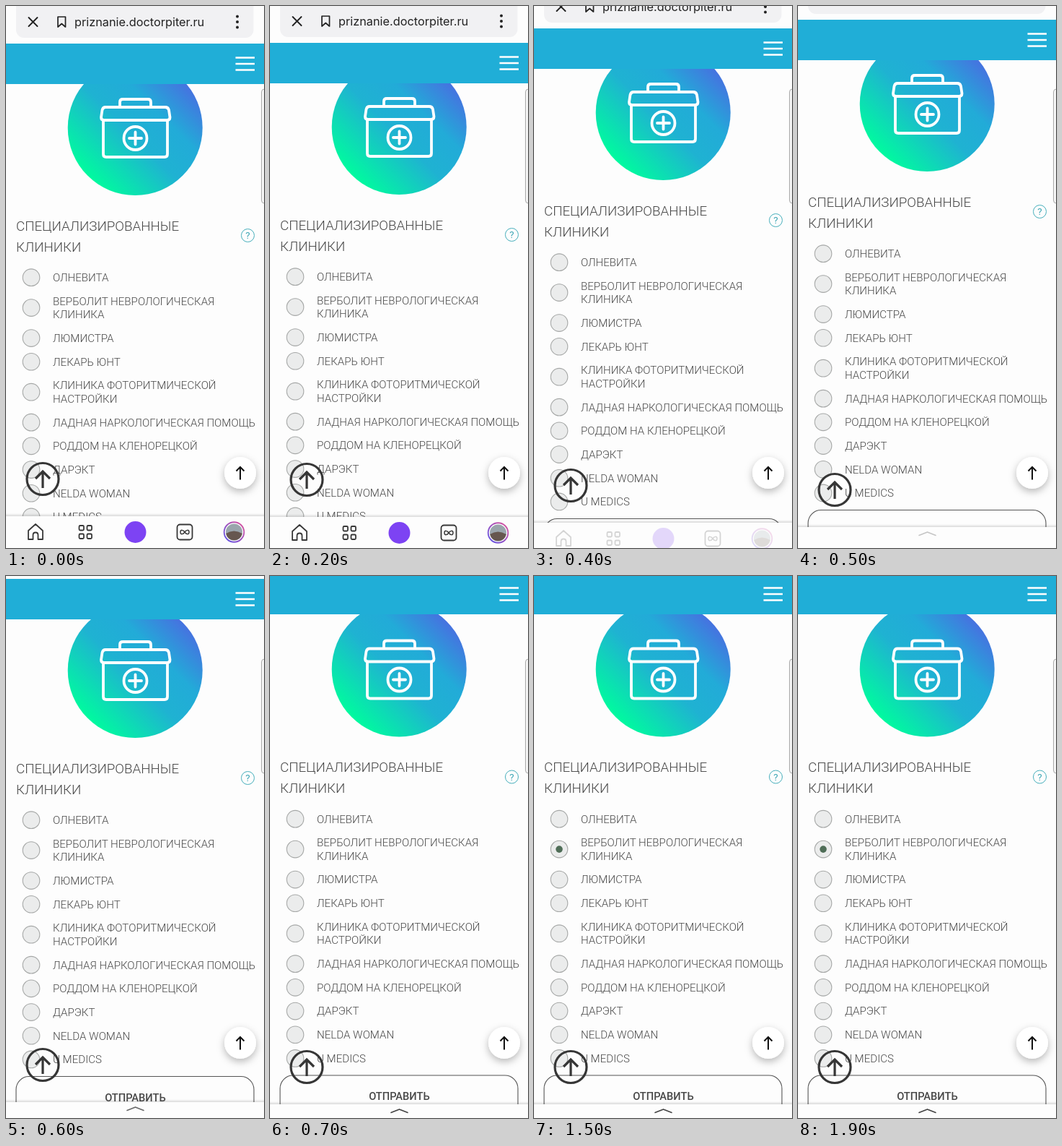
Recreate the animation shown at these times as an HTML page. Size 358 px wide and 750 px high, loop 2.1 s.

```html
<!DOCTYPE html>
<html lang="ru">
<head>
<meta charset="utf-8">
<title>Выбор клиники</title>
<style>
  html, body { margin: 0; width: 100%; height: 100%; overflow: hidden; background: #fdfdfd; }
  svg { display: block; width: 100%; height: 100%; }
  text { font-family: Roboto, sans-serif; fill: #484848; }
  .title { font-size: 18.75px; font-weight: 300; }
  .item { font-size: 15.1px; font-weight: 300; }
  .line { fill: none; stroke-linecap: round; stroke-linejoin: round; }
</style>
</head>
<body>
<svg viewBox="0 0 358 750">
  <defs>
    <linearGradient id="badge" gradientUnits="userSpaceOnUse" x1="113" y1="234" x2="245" y2="102">
      <stop offset="0" stop-color="#00fa9f"/>
      <stop offset=".45" stop-color="#1fb2d2"/>
      <stop offset=".7" stop-color="#22abd8"/>
      <stop offset="1" stop-color="#4672e0"/>
    </linearGradient>
    <linearGradient id="ring" x1="0" y1="1" x2="1" y2="0">
      <stop offset="0" stop-color="#5a55e8"/>
      <stop offset="1" stop-color="#e0559a"/>
    </linearGradient>
    <linearGradient id="edge" x1="0" y1="0" x2="0" y2="1">
      <stop offset="0" stop-color="#000" stop-opacity="0"/>
      <stop offset="1" stop-color="#000" stop-opacity=".14"/>
    </linearGradient>
    <filter id="shadow" x="-60%" y="-60%" width="220%" height="220%">
      <feDropShadow dx="0" dy="4" stdDeviation="5.500" flood-opacity=".28"/>
    </filter>
  </defs>

  <rect width="358" height="750" fill="#fdfdfd"/>

  <g id="content">
    <circle cx="179.2" cy="168.5" r="93.5" fill="url(#badge)"/>
    <g class="line" stroke="#fff" stroke-width="3.8">
      <path d="M158 139v-6q0-4 4-4h35q4 0 4 4v6"/>
      <path d="M138 140h83q4 0 5 4l1.500 10q0 4-4 4h-87.500q-4 0-4-4l1.500-10q1-4 4.500-4z"/>
      <path d="M135 159v46q0 4 4 4h81q4 0 4-4v-46"/>
      <circle cx="179.500" cy="183" r="16"/>
      <path d="M179.500 174.500v17M171 183h17"/>
    </g>
    <text class="title" x="14" y="310.500">СПЕЦИАЛИЗИРОВАННЫЕ</text>
    <text class="title" x="14" y="339.800">КЛИНИКИ</text>
    <circle cx="335.500" cy="317.500" r="9" fill="none" stroke="#45aebb"/>
    <text x="335.500" y="322.300" font-size="13.500" text-anchor="middle" style="fill:#3aa5b4">?</text>
    <g id="list"></g>
    <rect x="14" y="730.500" width="330" height="62" rx="18" fill="#fdfdfd" stroke="#555" stroke-width="1.100"/>
    <text x="179.500" y="764.500" font-size="14.700" font-weight="500" text-anchor="middle">ОТПРАВИТЬ</text>
  </g>

  <rect x="354.500" y="115" width="12" height="158" rx="4" fill="#f4f4f4" stroke="#aaa"/>

  <g id="header">
    <rect y="-10" width="358" height="63" fill="#fdfdfd"/>
    <rect x="14" y="-20" width="329.500" height="64" rx="11" fill="#f1f1f3"/>
    <g class="line" stroke="#222" stroke-width="1.900">
      <path d="M31.500 16l12 12m0-12l-12 12"/>
      <path d="M72 15h10.500v14l-5.250-4.500l-5.250 4.500z" stroke-width="1.700"/>
    </g>
    <text x="95" y="27.500" font-size="16.300" style="font-family:Inter,sans-serif;fill:#222">priznanie.doctorpiter.ru</text>
    <g fill="#222">
      <circle cx="321" cy="14.500" r="2"/><circle cx="321" cy="22" r="2"/><circle cx="321" cy="29.500" r="2"/>
    </g>
    <rect y="52" width="358" height="56" fill="#20aed7"/>
    <path d="M318.500 71.500h26.500m-26.500 8.500h26.500m-26.500 8.500h26.500" fill="none" stroke="#fff" stroke-width="2.700"/>
  </g>

  <g id="floating" class="line" stroke="#363636" stroke-width="3.200">
    <circle cx="51" cy="654.500" r="22"/>
    <path d="M51 667v-23m-10 10l10-10l10 10" stroke-linecap="butt" stroke-linejoin="miter"/>
  </g>

  <g>
    <circle cx="325" cy="646" r="22" fill="#fff" filter="url(#shadow)"/>
    <path d="M325 655.500v-17.500m-5.500 5.500l5.500-5.500l5.500 5.500" fill="none" stroke="#111" stroke-width="2"/>
  </g>

  <g id="bar">
    <rect y="702" width="358" height="4" fill="url(#edge)"/>
    <rect y="706" width="358" height="90" fill="#fdfdfd"/>
    <g id="icons">
      <g class="line" stroke="#383838" stroke-width="1.800">
        <path d="M31 726l10-9l10 9v12h-6.500v-6q0-3.500-3.500-3.500t-3.500 3.500v6h-6.500z"/>
        <rect x="101.500" y="719" width="6.500" height="6.500" rx="1.500"/>
        <rect x="112.500" y="719" width="6.500" height="6.500" rx="1.500"/>
        <rect x="101.500" y="730.500" width="6.500" height="6.500" rx="1.500"/>
        <rect x="112.500" y="730.500" width="6.500" height="6.500" rx="1.500"/>
        <rect x="237.500" y="717.500" width="21" height="21" rx="4"/>
        <path d="M248 728c-2-3-6-4-6 0s4 3 6 0s6-4 6 0s-4 3-6 0" stroke-width="1.500"/>
      </g>
      <circle cx="179.500" cy="728" r="15" fill="#7d43f3"/>
      <circle cx="316.500" cy="728" r="13.800" fill="#fff" stroke="url(#ring)" stroke-width="1.900"/>
      <circle cx="316.500" cy="728" r="11.500" fill="#9aa5ac"/>
      <path d="M305.200 730q11-7 22.600 0a11.500 11.500 0 0 1-22.600 0z" fill="#66574f"/>
    </g>
    <path id="chevron" class="line" d="M168 717.500l11.500-4.500l11.500 4.500" stroke="#444" stroke-width="1.600"/>
  </g>
</svg>

<script>
  const $ = id => document.getElementById(id);

  const clinics = [
    ["ОЛНЕВИТА"],
    ["ВЕРБОЛИТ НЕВРОЛОГИЧЕСКАЯ", "КЛИНИКА"],
    ["ЛЮМИСТРА"],
    ["ЛЕКАРЬ ЮНТ"],
    ["КЛИНИКА ФОТОРИТМИЧЕСКОЙ", "НАСТРОЙКИ"],
    ["ЛАДНАЯ НАРКОЛОГИЧЕСКАЯ ПОМОЩЬ"],
    ["РОДДОМ НА КЛЕНОРЕЦКОЙ"],
    ["ДАРЭКТ"],
    ["NELDA WOMAN"],
    ["U MEDICS"]
  ];
  const LINE = 18.5, GAP = 14.2, CHOICE = 1;

  let rowTop = 359.3;
  $("list").innerHTML = clinics.map((lines, i) => {
    const height = lines.length * LINE + GAP;
    const y = rowTop + height / 2;
    rowTop += height;
    const label = lines.map((line, n) => {
      const baseline = y + 5.4 + (n - (lines.length - 1) / 2) * LINE;
      return `<text class="item" x="65" y="${baseline}">${line}</text>`;
    }).join("");
    const dot = i === CHOICE ? `<circle id="dot" cx="35" cy="${y}" r="4.8" fill="#4f6d57"/>` : "";
    return `<circle cx="35" cy="${y}" r="11.8" fill="#ebecec" stroke="#a6a8a7" stroke-width="1.1"/>${dot}${label}`;
  }).join("");

  // One value per 100 ms; the last one holds until the loop restarts.
  const STEP = 100, LOOP = 2100, SELECT_AT = 1500;
  const motion = {
    header:  [0, 0, -1, -9, -21, -33, -48, -55],
    content: [0, 0, -1, -9, -21, -33, -38, -39.5],
    bar:     [0, 0, 1, 4, 9, 15, 22, 25],
    icons:   [1, 1, 1, .7, .2, 0, 0, 0],
    chevron: [0, 0, 0, 0, 0, .3, .8, 1]
  };
  const shift = (id, y) => $(id).setAttribute("transform", `translate(0 ${y})`);

  function draw() {
    const time = performance.now() % LOOP;
    const step = Math.min(7, Math.floor(time / STEP));
    shift("header", motion.header[step]);
    shift("content", motion.content[step]);
    shift("bar", motion.bar[step]);
    shift("floating", motion.bar[step]);
    $("icons").style.opacity = motion.icons[step];
    $("chevron").style.opacity = motion.chevron[step];
    $("dot").style.opacity = time >= SELECT_AT ? 1 : 0;
    requestAnimationFrame(draw);
  }
  draw();
</script>
</body>
</html>
```
